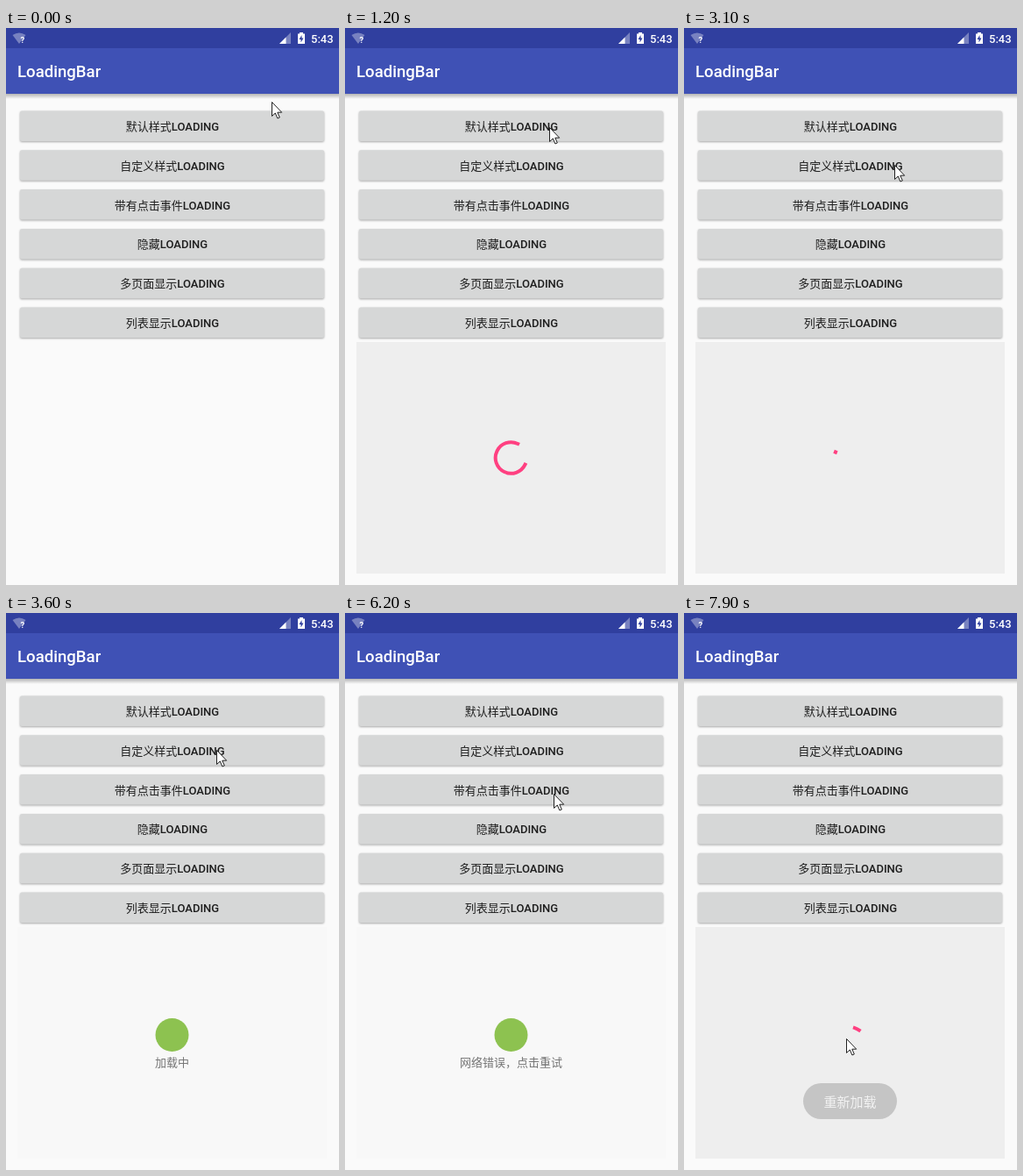
Recreate the animation shown at these times as an HTML page. Size 380 by 635 pixels, loop 8000 ms.

```html
<!DOCTYPE html>
<html lang="zh">
<head>
<meta charset="utf-8">
<title>LoadingBar</title>
<style>
  html, body { margin: 0; width: 100%; height: 100%; overflow: hidden; background: #fafafa; }
  svg { display: block; font: 400 13px Roboto, "Noto Sans CJK SC", "Noto Sans CJK", sans-serif; }
  .medium { font-weight: 500; }
  .button rect { fill: #d6d7d7; filter: drop-shadow(0 1px 1px #0005); }
  .button.pressed rect { filter: drop-shadow(0 1px 2.5px #0007); }
  .button text { fill: #1e1e1e; }
  .centered { text-anchor: middle; }
</style>
</head>
<body>
<svg width="380" height="635" viewBox="0 0 380 635">
  <defs>
    <linearGradient id="shade" x2="0" y2="1">
      <stop stop-color="#000" stop-opacity=".28"/>
      <stop offset="1" stop-color="#000" stop-opacity="0"/>
    </linearGradient>
  </defs>
  <rect width="380" height="635" fill="#fafafa"/>
  <rect y="75" width="380" height="6" fill="url(#shade)"/>
  <rect width="380" height="75" fill="#3f51b5"/>
  <rect width="380" height="23" fill="#303f9f"/>

  <g fill="#fff" class="medium">
    <path d="M7.5 8Q15 3 22.500 8L15 18z" opacity=".35"/>
    <text x="16.500" y="17" font-size="9.500" font-weight="700">?</text>
    <path d="M312 18H325V5z" opacity=".35"/>
    <path d="M312 18H319.500V10.500z"/>
    <path d="M335 5h4v1.500h2v11.500h-8v-11.500h2z"/>
    <path d="M337.500 8l-3 5h2v3.500l3-5h-2z" fill="#303f9f"/>
    <text x="348" y="17">5:43</text>
    <text x="13" y="56" font-size="18.600">LoadingBar</text>
  </g>

  <g id="buttons"></g>
  <rect id="panel" x="13" y="358" width="353" height="264"/>
  <g id="status">
    <circle cx="189.500" cy="481" r="19" fill="#8dc250"/>
    <text id="message" class="centered" x="189.500" y="517" fill="#757575"></text>
  </g>
  <path id="spinner" fill="none" stroke="#ff4081" stroke-width="4" stroke-linecap="square"/>
  <g id="toast">
    <rect x="136" y="536" width="107" height="41" rx="20.500" fill="#c5c5c5"/>
    <text class="centered" x="189.500" y="562.500" font-size="15" fill="#f2f2f2">重新加载</text>
  </g>
  <path id="cursor" d="M.5.5V16.500L4.300 13L6.900 19L9.300 18L6.800 12.200H11.700z"
        fill="#fff" stroke="#222" stroke-width="1"/>
</svg>
<script>
const LOOP = 8000, STEP = 100;
const $ = id => document.getElementById(id);
const labels = ["默认样式", "自定义样式", "带有点击事件", "隐藏", "多页面显示", "列表显示"];
$("buttons").innerHTML = labels.map((label, i) => `
  <g class="button" transform="translate(0 ${94.5 + 44.8 * i})">
    <rect x="16" width="347" height="34.500" rx="2"/>
    <text class="centered" x="190" y="22.500">${label}<tspan class="medium">LOADING</tspan></text>
  </g>`).join("");
const buttons = [...$("buttons").children];

// Press intervals of the first three buttons
const presses = [[600, 800], [3200, 3300], [5800, 5900]];

// Pointer tip: time, x, y
const pointer = [
  [0, 303, 84], [300, 233, 113], [2200, 233, 113], [2300, 233, 116],
  [2700, 240, 156], [4900, 240, 156], [5000, 248, 162], [5100, 249, 172],
  [5400, 239, 205], [6100, 239, 205], [6200, 238, 206], [6400, 238, 206],
  [6500, 250, 225], [6800, 312, 330], [7050, 250, 480], [7200, 205, 520],
  [7300, 186, 486], [7400, 185, 485], [LOOP, 185, 485]
];

function pointerAt(t) {
  const i = pointer.findIndex(k => k[0] > t);
  const [t0, x0, y0] = pointer[i - 1], [t1, x1, y1] = pointer[i];
  const k = (t - t0) / (t1 - t0);
  return [x0 + (x1 - x0) * k, y0 + (y1 - y0) * k];
}

// Progress at x on a Bezier easing from (x0, 0) to (x3, 1) with flat ends
function ease(x, x0, x1, x2, x3) {
  if (x <= x0) return 0;
  if (x >= x3) return 1;
  let lo = 0, hi = 1;
  for (let n = 0; n < 25; n++) {
    const u = (lo + hi) / 2, v = 1 - u;
    const at = x0 * v ** 3 + 3 * x1 * u * v * v + 3 * x2 * u * u * v + x3 * u ** 3;
    if (at < x) lo = u; else hi = u;
  }
  return lo * lo * (3 - 2 * lo);
}

// Material indeterminate ring, s in ms since its start
function ring(s) {
  const p = s / 1333 % 1, turn = s * 0.108 + 90 * p;
  const from = turn + 270 * ease(p, .5, .7, .6, 1);
  const to = Math.max(turn + 270 * ease(p, 0, .2, .1, .5), from + .5);
  const point = deg => {
    const a = deg * Math.PI / 180;
    return `${189.5 + 17.8 * Math.sin(a)} ${490 - 17.8 * Math.cos(a)}`;
  };
  return `M${point(from)}A17.8 17.8 0 ${+(to - from > 180)} 1 ${point(to)}`;
}

const show = (id, on) => $(id).setAttribute("display", on ? "inline" : "none");

function draw(t) {
  const custom = t >= 3300 && t < 7800;
  buttons.forEach((b, i) => {
    const [on, off] = presses[i] || [0, 0];
    b.classList.toggle("pressed", t >= on && t < off);
  });
  show("panel", t >= 600);
  $("panel").setAttribute("fill", custom ? "#f8f8f8" : "#eee");
  show("status", custom);
  $("message").textContent = t < 5900 ? "加载中" : "网络错误，点击重试";

  const s = (t - (t < 7800 ? 582 : 7806)) * 1.066;
  const spinning = !custom && s > 50;
  show("spinner", spinning);
  if (spinning) $("spinner").setAttribute("d", ring(s));
  show("toast", t >= 7900);
  $("cursor").setAttribute("transform", `translate(${pointerAt(t)})`);
}

const start = performance.now();
function tick() {
  const t = (performance.now() - start) % LOOP;
  draw(Math.floor(t / STEP) * STEP);
  requestAnimationFrame(tick);
}
tick();
</script>
</body>
</html>
```
